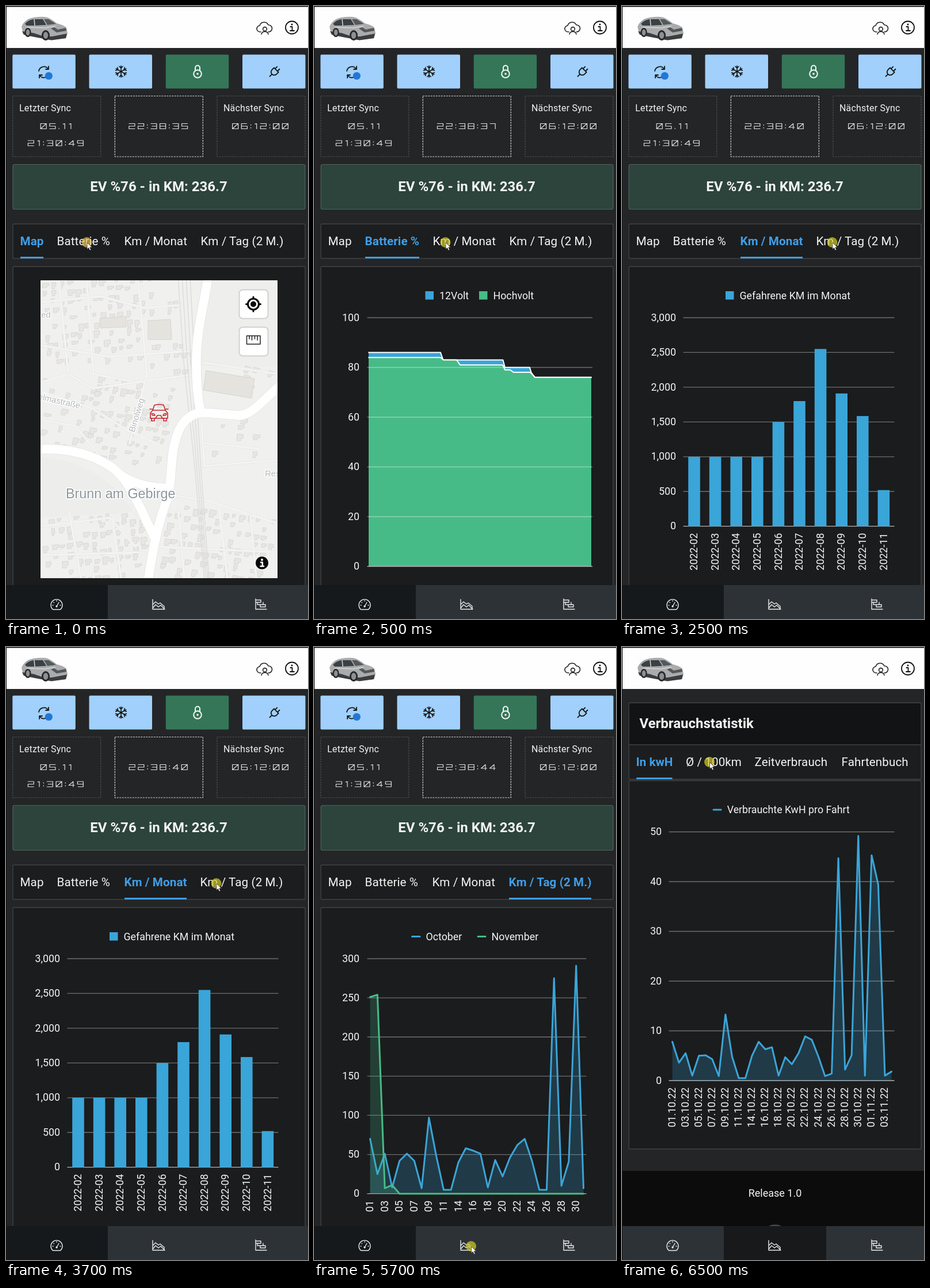
An HTML page for the animation above (8000 ms loop, 525 by 1066 pixels).

```html
<!DOCTYPE html>
<html lang="de">
<head>
<meta charset="utf-8">
<title>EV Dashboard</title>
<style>
html, body { margin: 0; width: 100%; height: 100%; overflow: hidden; background: #242527; }
svg { display: block; width: 525px; height: 1066px; }
text { font-family: Roboto, sans-serif; fill: #f4f4f4; white-space: pre; }
.tab { font-size: 20.6px; letter-spacing: .1px; }
.on { font-weight: 700; fill: #3f9ee8; }
.sync { font-size: 16px; letter-spacing: .2px; }
.chart { font-size: 17.8px; }
.line { fill: none; stroke-linejoin: round; stroke-linecap: round; }
.place { font-family: "Liberation Sans", sans-serif; paint-order: stroke; stroke: #fff; stroke-width: 3px; stroke-linejoin: round; }
</style>
</head>
<body>
<svg id="stage" viewBox="0 0 525 1066" xmlns="http://www.w3.org/2000/svg"></svg>
<script>
const BLUE = '#3aa5d8', GREEN = '#47bb87', LOOP = 8000;

const rect = (x, y, w, h, fill, more = '') =>
  `<rect x="${x}" y="${y}" width="${w}" height="${h}" fill="${fill}" ${more}/>`;
const text = (x, y, s, cls, more = '') => `<text x="${x}" y="${y}" class="${cls}" ${more}>${s}</text>`;
const path = (d, stroke, width, more = '') =>
  `<path class="line" d="${d}" stroke="${stroke}" stroke-width="${width}" ${more}/>`;
const dot = (x, y, r, fill, more = '') => `<circle cx="${x}" cy="${y}" r="${r}" fill="${fill}" ${more}/>`;
const at = (x, y, body, turn = 0) => `<g transform="translate(${x} ${y}) rotate(${turn})">${body}</g>`;
const poly = pts => 'M' + pts.map(p => p.map(n => +n.toFixed(1)).join(' ')).join('L');
const panel = (y, h, fill = '#1b1c1d') => rect(12, y, 508, h, fill, 'rx="2" stroke="#414243" stroke-width="1.3"');

// Wide outline digits: [advance, path]
const DIGITS = {
  0: [15.7, 'M0 0H10V9H0ZM0 9L10 0'], 1: [10.7, 'M1.2 .9L4 0V9'],
  2: [15.7, 'M0 0H10V4.5H0V9H10'], 3: [15.7, 'M0 0H10V9H0M2 4.5H10'],
  4: [15, 'M7.5 9V0L0 6.5H9.6'], 5: [15.7, 'M10 0H0V4.5H10V9H0'],
  6: [15.7, 'M9 0H0V9H10V4.5H0'], 7: [14.5, 'M0 0H9V9'],
  8: [15.7, 'M0 0H10V9H0ZM0 4.5H10'], 9: [15.7, 'M10 4.5H0V0H10V9H1'],
  ':': [6.6, 'M.6 1.8v1M.6 6.8v1'], '.': [6.6, 'M.6 8.2v.8']
};
function digits(cx, y, s) {
  let x = 0, out = '';
  for (const c of s) {
    out += at(x, 0, path(DIGITS[c][1], '#e2e2e2', 1.2));
    x += DIGITS[c][0];
  }
  return `<g role="img" aria-label="${s}">${at(cx - (x - 5.7) / 2, y, out)}</g>`;
}

function car() {
  const wheel = (x, y, rx, ry) => `<ellipse cx="${x}" cy="${y}" rx="${rx}" ry="${ry}" fill="#26282a"/>`
    + `<ellipse cx="${x}" cy="${y}" rx="${rx * .6}" ry="${ry * .68}" fill="#8d8f90"/>`;
  return `<path d="M27 36Q30 28 38 23Q50 18 68 19Q76 20 88 30Q101 33 105 38L107 47L104 56L78 59L46 53L30 49Z" fill="#a9abac"/>
  <path d="M33 31Q39 24 48 23L64 23L70 33L48 34L36 34Z" fill="#3c4043"/>
  <path d="M66 23L74 23L87 31L72 33Z" fill="#54595c"/>
  <path d="M49 23L50 34M36 37L68 38L86 35" fill="none" stroke="#d6d7d7" stroke-width="1.5"/>
  <path d="M28 44L48 47L66 53L80 53L106 48L104 56L79 59.5L50 54L31 50Z" fill="#3b3d3e"/>
  <path d="M78 39L84 37L90 41L104 38L105 43L88 46Z" fill="#55585a"/>`
    + wheel(38, 46, 5.5, 8) + wheel(69, 51, 7, 9);
}

function header() {
  return rect(0, 0, 525, 73, '#fefefe') + rect(0, 0, 525, 1.5, '#0b0c0d') + car()
    + path('M443 45H442A5.5 5.5 0 0 1 441 34A8 8 0 0 1 456 33A6 6 0 0 1 457 45H456', '#222', 1.6)
    + dot(450, 40, 3.4, 'none', 'stroke="#222" stroke-width="1.6"')
    + path('M444 49Q445 44.5 450 44.5T456 49', '#222', 1.6)
    + dot(497, 37.5, 11, 'none', 'stroke="#111" stroke-width="1.8"')
    + dot(497, 32, 1.5, '#111') + path('M494.5 36H497.5V43M494 43H501', '#111', 1.8);
}

function buttons() {
  let out = [11.3, 144.5, 277.7, 411].map((x, i) =>
    rect(x, 84.5, 109.5, 59, i === 2 ? '#357658' : '#a0d0fb', 'rx="2"')).join('');
  out += at(66, 115, path('M-9 -2A9 9 0 0 1 7 -6M9 2A9 9 0 0 1 -7 6M8 -10V-5H3M-8 10V5H-3', '#15181a', 1.8))
    + dot(74.3, 121.5, 6.6, '#2377d4');
  let flake = '';
  for (let a = 0; a < 360; a += 60) flake += at(0, 0, path('M0 0V-10M-3 -9L0 -6L3 -9', '#111', 1.6), a);
  out += at(200, 114, flake);
  out += dot(333, 118, 6.8, 'none', 'stroke="#f3f6f4" stroke-width="2"') + dot(333, 118, 1.8, '#f3f6f4')
    + path('M329 112V107.5A4 4 0 0 1 337 107.5V112', '#f3f6f4', 2);
  return out + at(467, 114, path('M-5.5 -4H5.5V1A5.5 5.5 0 0 1 -5.5 1ZM-3 -4V-9M3 -4V-9M0 7V12', '#111', 1.8), 45);
}

function nav(active) {
  const c = '#e9eaea';
  return [0, 177, 355].map((x, i) => rect(x, 1007, [177, 178, 170][i], 59,
      i === active ? (i ? '#17191b' : '#15191b') : '#2d3236')).join('')
    + at(88, 1041, path('M-6.5 8.5A10 10 0 1 1 6.5 8.5ZM0 3L4 -4M-7 1H-6M-5 -4L-4.5 -3.5M0 -7V-6M6 1H7', c, 1.4) + dot(0, 3, 1.7, c))
    + at(265, 1041, path('M-10 -9V8H11M-9 -1L-5 -5L0 -1L3 -3L10 3V8M-9 5L-5 0L0 4L4 1L10 7', c, 1.4))
    + at(443, 1041, path('M-9 -10V8H10M-9 -8H0V-4H-9M-6 -4V0H4V-4M-1 0V4H8V0H4', c, 1.4));
}

function tabs(y, items, xs, active, [from, to]) {
  return panel(y, 60, '#1c1d1e') + items.map((s, i) =>
    text(xs[i] - .5, y + 37, s, i === active ? 'tab on' : 'tab')).join('')
    + rect(from, y + 57, to - from, 3, '#3f9ee8');
}

function dash() {
  const box = (x, stroke) => rect(x, 156.5, 153, 105.5, 'none', `stroke="${stroke}" stroke-width="1.2" stroke-dasharray="3 1.5"`);
  return buttons() + box(11.7, '#4b4c4d') + box(189.3, '#d2d2d2') + box(367, '#4b4c4d')
    + text(23, 183, 'Letzter Sync', 'sync') + text(378, 183, 'Nächster Sync', 'sync')
    + digits(87, 204.5, '05.11') + digits(86.3, 234, '21:30:49') + digits(442, 204.5, '06:12:00')
    + rect(12, 275.5, 508, 78, '#2c443b', 'rx="3" stroke="#4e645b" stroke-width="1.2"')
    + text(265.5, 322, 'EV %76 - in KM: 236.7', '', 'text-anchor="middle" font-size="24" font-weight="700"')
    + panel(453, 600);
}

function grid(x1, x2, top, bottom, labels, edge) {
  const step = (bottom - top) / (labels.length - 1);
  return labels.map((s, i) => {
    const y = bottom - i * step;
    return path(`M${x1} ${y}H${x2}`, i ? 'rgba(255,255,255,.36)' : '#b5b5b5', 1.3)
      + text(edge, y + 5.6, s, 'chart', 'text-anchor="end"');
  }).join('');
}
const upright = (x, y, s) => text(0, 0, s, 'chart', `text-anchor="end" transform="translate(${x + 6} ${y}) rotate(-90)"`);

function series(values, x0, step, bottom, scale, color) {
  const pts = values.map((v, i) => [x0 + i * step, bottom - v * scale]);
  const end = x0 + (values.length - 1) * step;
  return `<path d="${poly(pts)}L${end} ${bottom}L${x0} ${bottom}Z" fill="${color}" opacity=".22"/>`
    + path(poly(pts), color, 3);
}

// Map
let seed = 7;
const rnd = () => (seed = seed * 16807 % 2147483647) / 2147483647;
function houses(x, y, w, h, turn, density) {
  let out = '';
  for (let j = 0; j < h; j += 15)
    for (let i = 0; i < w; i += 14) {
      if (rnd() > density) continue;
      const a = 5 + rnd() * 7, b = 5 + rnd() * 8, px = i + rnd() * 4, py = j + rnd() * 4;
      const f = n => n.toFixed(1);
      out += `M${f(px)} ${f(py)}h${f(a)}v${f(b * .6)}h${f(-a * .35)}v${f(b * .4)}h${f(-a * .65)}z`;
    }
  return at(x, y, `<path d="${out}" fill="#e7e6e3" stroke="#d9d8d5" stroke-width=".9"/>`, turn);
}

function map() {
  const streets = ['M92 477L108 640L60 655', 'M140 477L152 640L230 655', 'M60 515L165 505L240 525L305 520', 'M60 590L180 610L320 600',
    'M108 640L150 665L330 640', 'M60 670L150 700L215 740L260 760', 'M215 760L245 640L230 480', 'M60 720L120 730L170 790',
    'M60 905L180 890L225 940', 'M110 880L130 995', 'M185 890L200 995', 'M60 955L235 950', 'M285 850L350 860L472 900',
    'M300 880L310 995', 'M370 870L385 995', 'M425 885L435 995', 'M260 940L472 950', 'M340 725L345 800L472 790', 'M345 620L472 640', 'M345 760L440 770'];
  const roads = ['M352 468C342 530 330 570 331 625C331 660 334 685 338 705', 'M480 658C450 680 430 712 404 712C380 710 360 708 338 707C310 712 298 735 291 770C286 800 288 830 280 858C268 890 258 925 247 1000',
    'M55 771C110 768 150 780 182 801C218 825 235 880 260 928', 'M200 816C225 832 250 838 284 838'];
  const rails = [0, 7, 14, 21].map(d => `M${299 + d} 470L${309 + d * .9} 620L${328 + d * .5} 800L${345 + d * .4} 1000`);
  const button = y => rect(405.5, y, 50, 50, '#fff', 'rx="6" stroke="#d2d1cf" stroke-width="2"');
  const label = (x, y, s, turn) => text(0, 0, s, 'place', `style="fill:#b4b7b9" font-size="15" transform="translate(${x} ${y}) rotate(${turn})"`);
  const body = rect(60, 477, 412, 518, '#f0f0ee')
    + rect(338, 477, 134, 150, '#eeeeed') + '<path d="M60 785Q190 790 250 935L225 880L60 890Z" fill="#ededeb"/>'
    + houses(62, 480, 185, 150, -4, .72) + houses(66, 645, 95, 115, 12, .55) + houses(160, 640, 140, 150, 10, .62)
    + houses(245, 590, 80, 60, -5, .55) + houses(60, 892, 180, 110, -5, .65) + houses(282, 865, 190, 130, 8, .66)
    + houses(345, 725, 125, 60, 3, .25) + houses(250, 482, 46, 55, 0, .4) + houses(390, 615, 80, 95, 15, .22)
    + streets.map(d => path(d, '#e7e7e5', 4.4) + path(d, '#f4f4f3', 3.2)).join('')
    + '<path d="M247 547L286 545L288 580L247 580ZM163 543L209 540V558L164 560ZM348 634L432 648L427 682L343 668Z" fill="#e4e3dd" stroke="#d7d6d1"/>'
    + rails.map(d => path(d, '#dddddb', 1.5)).join('')
    + roads.map(d => path(d, '#e6e6e4', 17.5)).join('') + roads.map(d => path(d, '#fff', 15.5)).join('')
    + label(45, 681, 'Pelmastraße', 13) + label(223, 742, 'Binolweg', -73) + label(61, 542, 'ed', 0) + label(450, 818, 'Resel', 0)
    + text(104, 856, 'Brunn am Gebirge', 'place', 'style="fill:#8e979d" font-size="23.3"');
  const sedan = path('M-11 -4L-8 -13Q0 -15 8 -13L11 -4ZM-11 -4L-15 1V10H15V1L11 -4M-16 -6H-12M16 -6H12', '#c4262b', 1.6)
    + path('M-13 10V14.5H-8V10M13 10V14.5H8V10M-6 10L-3 5H3L6 10', '#c4262b', 1.6)
    + path('M-13 2Q-8 1 -7 5Q-12 6 -13 2ZM13 2Q8 1 7 5Q12 6 13 2Z', '#c4262b', 1.4);
  return `<clipPath id="frame"><rect x="60" y="477" width="412" height="518"/></clipPath><g clip-path="url(#frame)">${body}</g>`
    + button(493.5) + button(558.5)
    + at(430, 518.5, dot(0, 0, 9.5, 'none', 'stroke="#0a0a0a" stroke-width="3.2"') + dot(0, 0, 5, '#0a0a0a') + path('M0 -12.5V-10M0 10V12.5M-12.5 0H-10M10 0H12.5', '#0a0a0a', 3))
    + path('M418.5 573.5H442V588H418.5ZM423 574V579M427.5 574V581M432.5 574V579M437 574V581', '#222', 1.5)
    + dot(445, 968.5, 11, '#080808') + dot(445, 963, 2, '#fff') + path('M443 967.5H445.8V974M442.5 974.3H448', '#fff', 2.6)
    + at(266, 707, sedan);
}

function battery() {
  const y = v => 974.5 - v * 4.325;
  const area = (pts, fill) => {
    const d = poly(pts.map(([x, v]) => [x, y(v)]));
    return `<path d="${d}V974.5H95Z" fill="${fill}"/>` + path(d, '#fff', 2);
  };
  return rect(193.5, 496, 14.5, 14.5, BLUE) + text(218, 509.7, '12Volt', 'chart')
    + rect(287, 496, 14.5, 14.5, GREEN) + text(311.5, 509.7, 'Hochvolt', 'chart')
    + area([[95, 86], [220, 86], [224.5, 83], [328.5, 83], [332, 80], [375, 80], [377.5, 78], [384, 76], [482, 76]], BLUE)
    + area([[95, 84], [220, 84], [225, 83], [248, 83], [254, 81], [328, 81], [332, 79], [341, 79], [347, 78], [376, 78], [384, 76], [482, 76]], GREEN)
    + grid(93, 483.5, 542, 974.5, [0, 20, 40, 60, 80, 100], 79);
}

function months() {
  const km = [1000, 1000, 1000, 1000, 1500, 1800, 2550, 1910, 1585, 520];
  return rect(180, 496, 14.5, 14.5, BLUE) + text(204.5, 509.7, 'Gefahrene KM im Monat', 'chart')
    + grid(107, 473, 542, 904.7, ['0', '500', '1,000', '1,500', '2,000', '2,500', '3,000'], 94)
    + km.map((v, i) => {
      const x = 125.5 + i * 36.6, h = v * .1209;
      return rect(x - 10.3, 904.7 - h, 20.6, h, BLUE) + upright(x - .3, 916.5, '2022-' + String(i + 2).padStart(2, '0'));
    }).join('');
}

function days() {
  const oct = [70, 25, 51, 8, 42, 51, 42, 7, 97, 48, 5, 5, 40, 58, 55, 51, 8, 43, 22, 46, 62, 70, 42, 5, 5, 275, 10, 41, 291, 7];
  const nov = oct.map((_, i) => [251, 254, 7, 11][i] || 0);
  const step = 371 / 29, names = oct.map((_, i) => String(i < 11 ? i + 1 : i + 2).padStart(2, '0'));
  return path('M170.5 503.5H184', BLUE, 3) + text(194.5, 509.7, 'October', 'chart')
    + path('M285 503.5H298', GREEN, 3) + text(308.5, 509.7, 'November', 'chart')
    + grid(93, 473, 542, 950.7, [0, 50, 100, 150, 200, 250, 300], 79)
    + series(oct, 97.5, step, 950.7, 1.3623, BLUE) + series(nov, 97.5, step, 950.7, 1.3623, GREEN)
    + names.map((s, i) => i % 2 ? '' : upright(97 + i * step, 962.5, s)).join('');
}

function stats() {
  const kwh = [7.8, 3.6, 5.5, 1, 5, 5.1, 4.3, .9, 13.3, 4.8, .5, .5, 5, 7.8, 6.3, 6.7, 1, 4.7, 3.3, 5.5, 8.9, 8.2, 4.8, .9, 1.4,
    44.7, 2.2, 5.1, 49.2, 1, 45.3, 39.4, 1, 1.8];
  const step = 381 / 33;
  const date = i => {
    const d = i < 11 ? i + 1 : i + 2;
    return (d > 31 ? `0${d - 31}.11` : String(d).padStart(2, '0') + '.10') + '.22';
  };
  return panel(97, 74, '#121314') + text(30.3, 141, 'Verbrauchstatistik', '', 'font-size="24" font-weight="700"')
    + tabs(170, ['In kwH', 'Ø / 100km', 'Zeitverbrauch', 'Fahrtenbuch'], [25, 111.5, 231, 382], 0, [25, 87.5])
    + panel(232.5, 640.5) + path('M159 283H172', BLUE, 3) + text(182.7, 289, 'Verbrauchte KwH pro Fahrt', 'chart')
    + grid(82, 473, 321.5, 754, [0, 10, 20, 30, 40, 50], 69)
    + series(kwh, 87.5, step, 754, 8.65, BLUE)
    + kwh.map((_, i) => i % 2 ? '' : upright(86.5 + i * step, 766, date(i))).join('')
    + rect(0, 911, 525, 96, '#0c0c0d') + text(266, 955.5, 'Release 1.0', '', 'text-anchor="middle" font-size="18"')
    + '<ellipse cx="266" cy="1009" rx="12" ry="4.5" fill="#4a4c4e"/>';
}

const cursor = (x, y, fill = '#d1cc2a') => dot(x, y, 9, fill, 'opacity=".7"')
  + `<path d="M${x + .5} ${y + .5}v11.5l2.7 -2.5l2 4.5l2 -1l-2 -4.2h3.8z" fill="#fff" stroke="#222" stroke-width=".7"/>`;

const TABS = ['Map', 'Batterie %', 'Km / Monat', 'Km / Tag (2 M.)'];
const view = (i, xs, bar, clock, chart) => tabs(379, TABS, xs, i, bar) + digits(264.7, 204.5, clock) + chart;

// [start, dashboard behind, own content, active nav item, pointer]
const STEPS = [
  [0, true, view(0, [25, 89, 206, 339], [25, 65], '22:38:35', map()), 0, cursor(140.5, 411, '#e6bd58')],
  [500, true, view(1, [25, 89, 207, 340], [89, 183], '22:38:37', battery()), 0, cursor(228.5, 411)],
  [2500, true, view(2, [25, 89, 206, 338], [206, 314], '22:38:40', months()), 0, cursor(365.5, 411)],
  [4500, true, view(3, [25, 89, 206, 339], [339, 482], '22:38:44', days()), 0, cursor(273, 1042)],
  [6500, false, stats(), 1, cursor(152, 200)]
];

const stage = document.getElementById('stage');
stage.innerHTML = rect(0, 0, 525, 1066, '#242527') + header() + `<g id="dash">${dash()}</g>`
  + STEPS.map(([, , body, active, pointer]) => `<g class="step">${body}${nav(active)}${pointer}</g>`).join('')
  + rect(0, 0, 1, 1066, '#0d0e10');

const common = document.getElementById('dash'), layers = [...stage.querySelectorAll('.step')];
let shown = -1;
function draw(now) {
  const t = now % LOOP;
  const k = STEPS.findLastIndex(s => s[0] <= t);
  if (k === shown) return;
  shown = k;
  layers.forEach((g, i) => g.style.display = i === k ? '' : 'none');
  common.style.display = STEPS[k][1] ? '' : 'none';
}
function tick() {
  draw(performance.now());
  requestAnimationFrame(tick);
}
tick();
</script>
</body>
</html>
```
